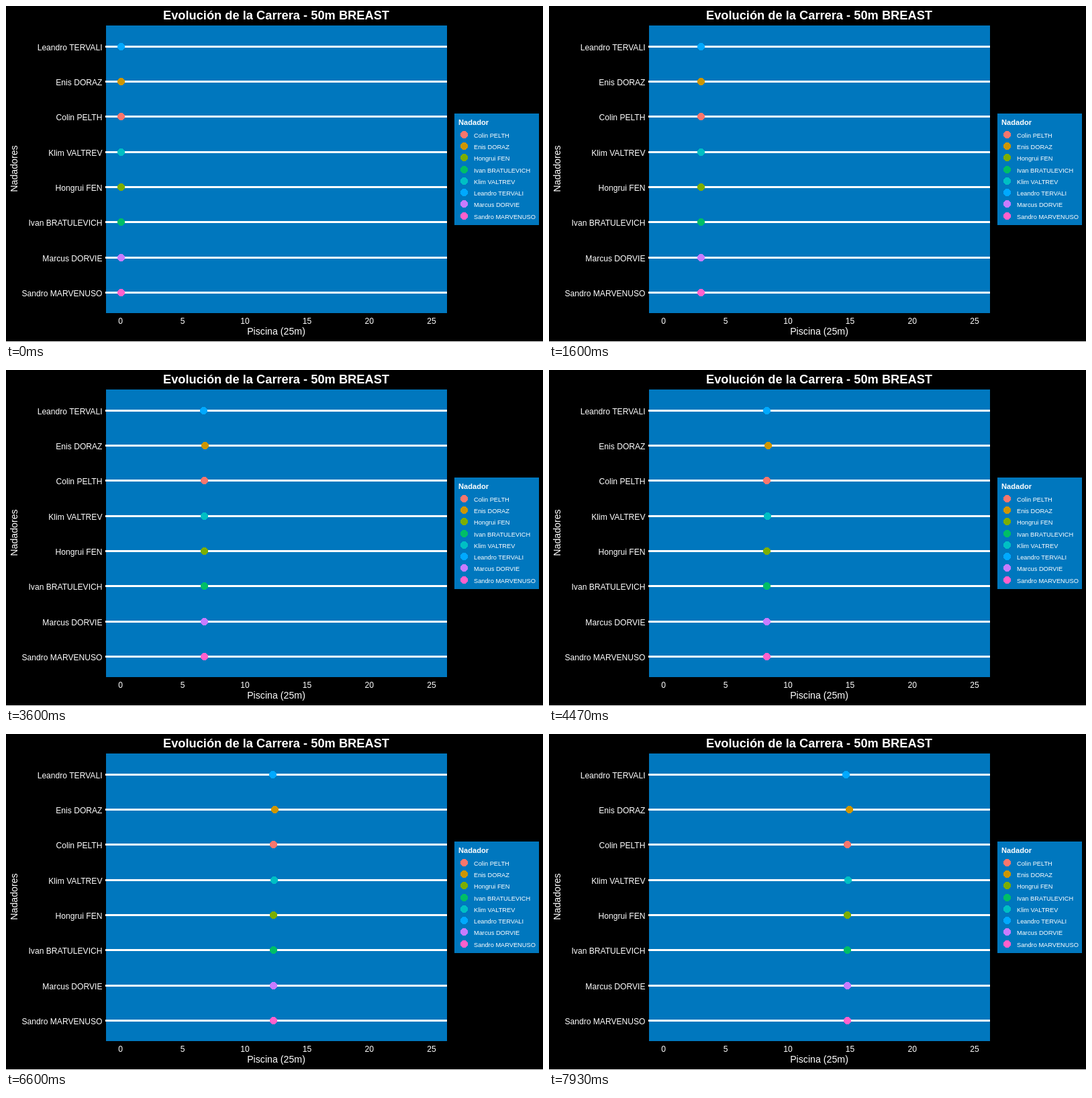
Animation of 800x500 px, one loop 8 s. Source, as an HTML page:

```html
<!DOCTYPE html>
<html lang="es">
<head>
<meta charset="utf-8">
<title>Evolución de la Carrera</title>
<style>
  html, body { margin: 0; width: 100%; height: 100%; overflow: hidden; background: #fff; }
  svg { display: block; width: 800px; height: 500px; font-family: "Liberation Sans", Arial, sans-serif; fill: #fff; }
  rect, circle { shape-rendering: crispEdges; }
  .middle { text-anchor: middle; }
  .end { text-anchor: end; }
  .bold { font-weight: bold; }
</style>
</head>
<body>
<svg id="chart" viewBox="0 0 800 500"></svg>
<script>
const LOOP = 8000;
const STEP = 1000 / 15;
const START_X = 171.5;
const WATER = '#0077BE';

// Lanes from top to bottom; speed in pixels per step.
const swimmers = [
  { name: 'Leandro TERVALI', color: '#00A9FF', speed: 2.2828 },
  { name: 'Enis DORAZ', color: '#CD9600', speed: 2.3175 },
  { name: 'Colin PELTH', color: '#F8766D', speed: 2.2938 },
  { name: 'Klim VALTREV', color: '#00BFC4', speed: 2.305 },
  { name: 'Hongrui FEN', color: '#7CAE00', speed: 2.2938 },
  { name: 'Ivan BRATULEVICH', color: '#00BE67', speed: 2.2938 },
  { name: 'Marcus DORVIE', color: '#C77CFF', speed: 2.2938 },
  { name: 'Sandro MARVENUSO', color: '#FF61CC', speed: 2.2938 }
];

const chart = document.getElementById('chart');

function add(tag, attributes, content = '') {
  const node = document.createElementNS('http://www.w3.org/2000/svg', tag);
  for (const [key, value] of Object.entries(attributes)) node.setAttribute(key, value);
  node.textContent = content;
  return chart.appendChild(node);
}

const rect = (x, y, width, height, fill) => add('rect', { x, y, width, height, fill });
const dot = (cx, cy, fill) => add('circle', { cx, cy, r: 5.5, fill });
const text = (content, x, y, size, style = '') =>
  add('text', { x, y, 'font-size': size, class: style }, content);

// The chart leaves one white row at the bottom of the stage.
rect(0, 0, 800, 499, '#000');
rect(149, 29, 508, 428, WATER);
text('Evolución de la Carrera - 50m BREAST', 402.5, 20, 18.27, 'middle bold');
text('Piscina (25m)', 402.5, 489, 14.2, 'middle');
text('Nadadores', 0, 0, 14.2, 'middle').setAttribute('transform', 'translate(17 242) rotate(-90)');
for (let metres = 0; metres <= 25; metres += 5) {
  text(metres, 170.5 + metres * 18.54, 473, 12.1, 'middle');
}

swimmers.forEach((swimmer, lane) => {
  const y = Math.floor(60 + lane * 52.35);
  rect(148, y - 1, 509, 3, '#fff');
  text(swimmer.name, 143.5, y + 6, 12.1, 'end');
  swimmer.dot = dot(START_X, y + 0.5, swimmer.color);
});

rect(668, 160, 126, 166, WATER);
text('Nadador', 674, 177, 11.1, 'bold');
[...swimmers].sort((a, b) => a.name < b.name ? -1 : 1).forEach(({ name, color }, row) => {
  const y = Math.floor(191.15 + row * 17.3);
  dot(682.5, y + 0.5, color);
  text(name, 697, y + 5, 9.25);
});

function draw(time) {
  // Step boundaries fall on the nearest hundredth of a second.
  const hundredths = Math.floor((time % LOOP) / 10);
  const step = Math.floor((hundredths * 10 + 5) / STEP);
  for (const { dot, speed } of swimmers) {
    dot.setAttribute('cx', START_X + Math.round(step * speed - 0.2));
  }
}

const begin = performance.now();
function tick() {
  draw(performance.now() - begin);
  requestAnimationFrame(tick);
}
tick();
</script>
</body>
</html>
```
